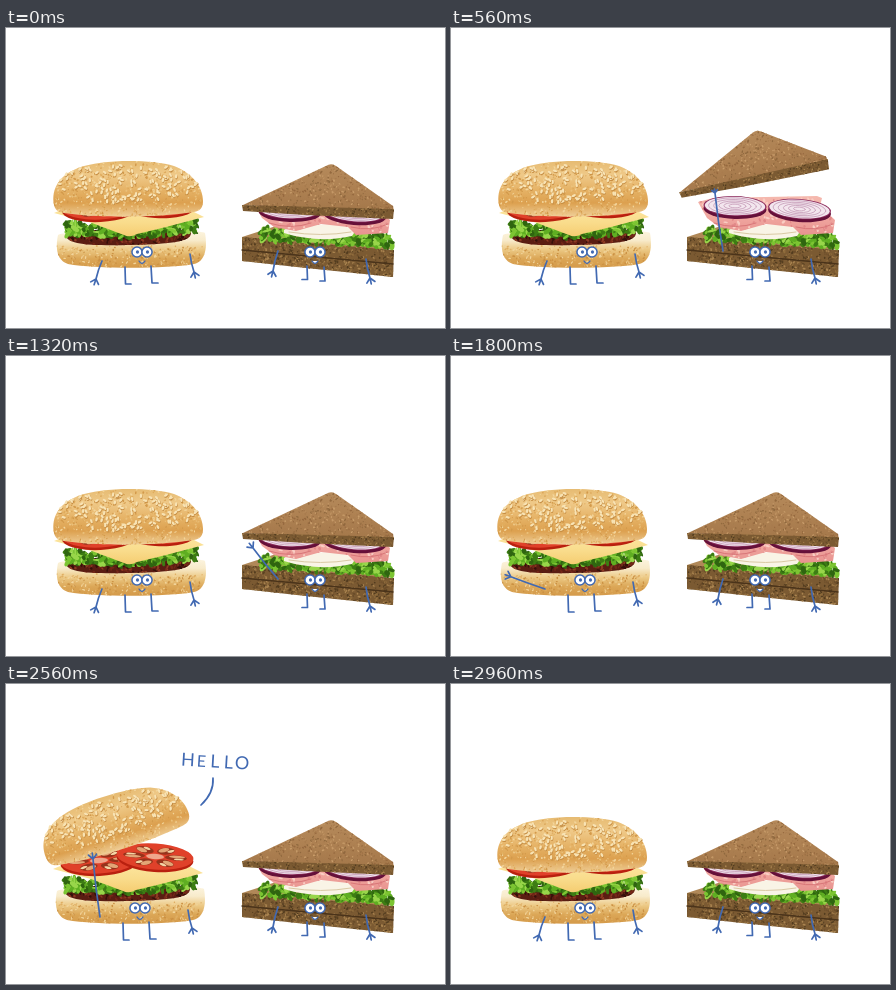
Write an HTML page with a canvas that moves like this. It is 439 by 300 pixels and loops after 3 s.

```html
<!DOCTYPE html>
<html lang="en">
<head>
<meta charset="utf-8">
<title>Hello</title>
<style>
html, body { margin: 0; width: 100%; height: 100%; overflow: hidden; background: #fff; }
canvas { display: block; }
</style>
</head>
<body>
<canvas id="stage" width="439" height="300"></canvas>
<script>
const ctx = document.getElementById('stage').getContext('2d');
const LOOP = 3000, STEP = 40, STAGES = 13, INK = '#4169b2', TAU = Math.PI * 2;

const clamp = v => Math.max(0, Math.min(1, v));
const ease = v => v * v * (3 - 2 * v);
const ramp = (t, from, to) => clamp((t - from) / (to - from));
const mix = (a, b, k) => a.map((v, i) => v + (b[i] - v) * k);

function randomizer(seed) {
  return () => (seed = (seed * 16807) % 2147483647) / 2147483647;
}

function shade(y0, y1, ...colors) {
  const g = ctx.createLinearGradient(0, y0, 0, y1);
  colors.forEach((c, i) => g.addColorStop(i / (colors.length - 1), c));
  return g;
}

function fill(d, color) {
  const p = new Path2D(d);
  ctx.fillStyle = color;
  ctx.fill(p);
  return p;
}

function stroke(d, color = INK, width = 1.7) {
  ctx.strokeStyle = color;
  ctx.lineWidth = width;
  ctx.stroke(new Path2D(d));
}

function oval(x, y, rx, ry, color, tilt = 0) {
  ctx.beginPath();
  ctx.ellipse(x, y, rx, ry, tilt, 0, TAU);
  ctx.fillStyle = color;
  ctx.fill();
}

// Random flecks inside a path, spread over the box x, y, w, h
function grain(p, [x, y, w, h], count, size, colors, seed) {
  const rnd = randomizer(seed);
  ctx.save();
  ctx.clip(p);
  for (let i = 0; i < count; i++) {
    oval(x + rnd() * w, y + rnd() * h, size * (0.5 + rnd()), size * (0.4 + rnd() * 0.5),
      colors[i % colors.length], rnd() * 3);
  }
  ctx.restore();
}

function lettuce(x0, y0, x1, y1, depth, count, seed) {
  const rnd = randomizer(seed);
  const greens = ['#3d7d14', '#5fae22', '#7cc532', '#2f6510', '#98d64a'];
  for (let i = 0; i < count; i++) {
    const k = rnd();
    oval(x0 + (x1 - x0) * k, y0 + (y1 - y0) * k + (rnd() - 0.5) * depth,
      2 + rnd() * 3, 1 + rnd() * 1.8, greens[i % 5], rnd() * 3);
  }
}

// Draws a lid turned around a pivot and moved by dx, dy
function withLid([px, py], dx, dy, angle, draw) {
  ctx.save();
  ctx.translate(px + dx, py + dy);
  ctx.rotate(angle);
  ctx.translate(-px, -py);
  draw();
  ctx.restore();
}

function tomato(x, y, tilt) {
  oval(x, y + 2.5, 38.5, 13, '#b9200f', tilt);
  oval(x, y, 38.5, 13, '#e0412a', tilt);
  ctx.save();
  ctx.translate(x, y);
  ctx.rotate(tilt);
  ctx.scale(1, 1 / 3);
  for (let i = 0; i < 6; i++) {
    ctx.rotate(TAU / 6);
    oval(21, 0, 11, 8, '#96331c');
    oval(22, -3, 8, 4, '#e3a576');
    oval(24, 4, 5, 2.5, '#f3d5a6');
  }
  oval(0, 0, 9, 8, '#efa68c');
  ctx.restore();
}

function onion(x, y, tilt) {
  oval(x, y + 3, 31.5, 10, '#651039', tilt);
  oval(x, y, 31.5, 10, '#8a2a5c', tilt);
  oval(x, y, 30.3, 9.2, '#f3e6ee', tilt);
  ctx.strokeStyle = '#c49ab6';
  ctx.lineWidth = 0.8;
  for (let k = 0.88; k > 0.1; k -= 0.17) {
    ctx.beginPath();
    ctx.ellipse(x, y, 30 * k, 9.2 * k, tilt, 0, TAU);
    ctx.stroke();
  }
}

function face(x, y, mouth) {
  for (const side of [-5, 5]) {
    oval(x + side, y, 5.8, 5.8, INK);
    oval(x + side, y, 4.3, 4.3, '#fff');
    oval(x + side + 0.5, y, 1.6, 1.8, INK);
  }
  const smile = `M${x - 3} ${y + 9} Q${x} ${y + 14} ${x + 3} ${y + 9}`;
  if (mouth) fill(smile, mouth);
  stroke(smile, INK, 1.4);
}

function arm([x, y], [hx, hy], finger = 6) {
  const bend = [(x + hx) / 2 - 1, (y + hy) / 2];
  const angle = Math.atan2(hy - y, hx - x);
  let d = `M${x} ${y} Q${bend} ${hx} ${hy}`;
  for (const spread of [-0.75, 0, 0.75]) {
    d += `M${hx} ${hy} l${Math.cos(angle + spread) * finger} ${Math.sin(angle + spread) * finger}`;
  }
  stroke(d);
}

// The hand swings around the shoulder from rest to the lid edge, then up with the lid
function handAt([x, y], rest, edge, raised, pose) {
  const polar = ([hx, hy]) =>
    [(Math.atan2(hy - y, hx - x) + TAU) % TAU, Math.hypot(hx - x, hy - y)];
  const atEdge = mix(polar(rest), polar(edge), pose.arm);
  const [angle, reach] = mix(atEdge, polar(raised), pose.lid);
  return [x + Math.cos(angle) * reach, y + Math.sin(angle) * reach];
}

function hello(x, y, angle, gap, tail, progress) {
  if (progress > 0.1) stroke(tail);
  ctx.save();
  ctx.translate(x, y);
  ctx.rotate(angle);
  ctx.textAlign = 'center';
  ctx.fillStyle = INK;
  [...'HELLO'].forEach((letter, i) => {
    if (progress < (i + 1) / 5.5) return;
    ctx.font = `${letter === 'E' ? 16 : 18}px Lato, sans-serif`;
    ctx.fillText(letter, i * gap, 0);
  });
  ctx.restore();
}

// Arm up, lid open and word, each 0 to 1; the way back runs the same stages in reverse
function greeting(t, start, end, closingSteps) {
  const forth = clamp(((t - start) / STEP + 1) / STAGES);
  const back = clamp(((t - end) / STEP + 1) / closingSteps);
  const stage = STAGES * (forth - back);
  return {
    arm: ramp(stage, 0, 4.2),
    lid: ease(ramp(stage, 4.8, 9.8)),
    word: ramp(stage, 10, 11.8)
  };
}

function burger(pose, drift) {
  ctx.save();
  ctx.translate(-drift / 2, 0);
  const base = fill('M52 207 C60 202 190 200 199 205 C202 222 198 234 188 236 C160 241 90 241 62 236 C49 232 50 216 52 207Z',
    shade(203, 240, '#fcf4df', '#f8ebcb', '#ecc985', '#dba656', '#d49a4a'));
  grain(base, [50, 218, 150, 22], 300, 1.1, ['#cb9143', '#f2d59c', '#dfae63'], 11);
  const patty = fill('M60 207 C62 200 182 198 185 204 C186 213 170 216 125 217 C80 218 60 216 60 207Z', '#5a1d12');
  grain(patty, [60, 199, 126, 19], 200, 1.6, ['#8d3a22', '#35100a', '#742718'], 23);
  lettuce(60, 201, 125, 203, 13, 150, 31);
  lettuce(125, 203, 191, 198, 13, 150, 37);
  fill('M48 185 L86 195 L118 207 Q124 210 131 206 L160 199 L198 189 L180 180 L60 180Z',
    shade(180, 209, '#fce69f', '#f9dc8c', '#f5cc70'));
  const press = 2 * (1 - pose.lid);
  tomato(94, 176.5 + press, -0.05);
  tomato(150, 172.5 + press, 0.07);
  withLid([122, 162], -13.5 * pose.lid, -22 * pose.lid, -0.3 * pose.lid, () => {
    const bun = fill('M48 177 C45 160 54 147 72 140 C95 131 145 131 168 138 C188 146 197 160 197 173 C197 180 194 183 188 184 C150 190 90 190 58 185 C51 184 49 181 48 177Z',
      shade(133, 189, '#e6bb72', '#efc988', '#e6b468', '#dca04f', '#f0d09a'));
    grain(bun, [46, 133, 152, 56], 700, 1.1, ['#d39a4b', '#f3d59b', '#dfab5c', '#eac07a'], 41);
    const rnd = randomizer(53);
    for (let i = 0; i < 135; i++) {
      const a = rnd() * TAU, r = Math.sqrt(rnd()), tilt = rnd() * 3;
      const x = 122 + Math.cos(a) * r * 69, y = 155 + Math.sin(a) * r * 20;
      oval(x + 0.4, y + 0.8, 2.3, 1.3, '#c58c42', tilt);
      oval(x, y, 2.2, 1.2, '#f8e3b4', tilt);
    }
  });
  ctx.restore();

  ctx.save();
  ctx.translate(-drift, 0);
  stroke('M119 239 L119.5 256 H125 M145 238 L146 255 H152');
  arm([184, 226], [188, 244]);
  const shoulder = [96, 233];
  arm(shoulder, handAt(shoulder, [90, 251], [72, 197], [89, 175], pose));
  face(136, 224);
  ctx.restore();
  hello(181.5, 82, 0.06, 13.6, 'M207 94 Q208 109 195 121', pose.word);
}

function sandwich(pose) {
  const crumbs = ['#523c1f', '#a9834f', '#6a4c29', '#8f6c3c'];
  fill('M236 209 L270 198 L360 208 L388 221 L300 222Z', '#b08858');
  const base = fill('M236 209 L388 222 L387 249 L300 240 L236 233Z', '#7b5a32');
  grain(base, [235, 207, 154, 43], 1100, 1.1, crumbs, 61);
  stroke('M236 222 L387 236', '#4a331a', 1.3);
  lettuce(255, 206, 386, 213, 12, 300, 71);
  fill('M278 202 C290 194 310 198 325 196 C340 192 354 200 346 208 C325 213 300 212 278 205Z', '#f9f4e6');
  const ham = fill('M247 174 L262 170 L366 168 L371 170 L369 178 L384 192 L382 205 L350 207 L342 199 L315 196 L290 203 L268 199 L256 190Z',
    shade(168, 207, '#f5b9ae', '#f1a8a1', '#e8938f'));
  grain(ham, [247, 168, 138, 40], 130, 1.6, ['#f9cdc3', '#e28888'], 83);
  stroke('M263 195 Q285 202 305 195 M345 199 Q365 204 382 196', '#d87678', 1);
  stroke('M283 204 Q315 209 345 204', '#d9c9a4', 1);
  const press = 3 * (1 - pose.lid);
  onion(284, 178 + press, 0.03);
  onion(348.5, 181 + press, 0.08);
  withLid([312.5, 183.5], -8.5 * pose.lid, -31.5 * pose.lid, -0.245 * pose.lid, () => {
    const top = fill('M237 177 L322 137 Q326 135 330 138 L387 178 L388 184Z',
      shade(136, 184, '#b58a5b', '#ae8152', '#a3774a'));
    grain(top, [237, 135, 152, 50], 900, 1, ['#8f683e', '#c89c6a', '#a87b4e', '#96693f'], 91);
    const crust = fill('M236 177 L388 181 L387 191 L300 187 L237 183Z', '#7b5a32');
    grain(crust, [236, 175, 153, 18], 400, 1, crumbs, 97);
  });

  stroke('M301 238 L301.5 251.5 H296 M318 239 L319 253 H314');
  arm([360, 231], [364, 250]);
  const shoulder = [272, 223];
  arm(shoulder, handAt(shoulder, [267, 243], [247, 192], [264, 165], pose), 6 - 2 * pose.lid);
  face(309, 224, '#fff');
  hello(205, 115, -0.27, 14.2, 'M226 118 Q226 126 231 131', pose.word);
}

function draw(t) {
  ctx.fillStyle = '#fff';
  ctx.fillRect(0, 0, 439, 300);
  ctx.lineCap = ctx.lineJoin = 'round';
  burger(greeting(t, 1720, 2560, 11), t >= 1720 ? 2 : 0);
  sandwich(greeting(t, 200, 1040, 12));
}

let shown = -1;
function frame(now) {
  const t = Math.floor(now % LOOP / STEP) * STEP;
  if (t !== shown) draw(shown = t);
  requestAnimationFrame(frame);
}
requestAnimationFrame(frame);
</script>
</body>
</html>
```
